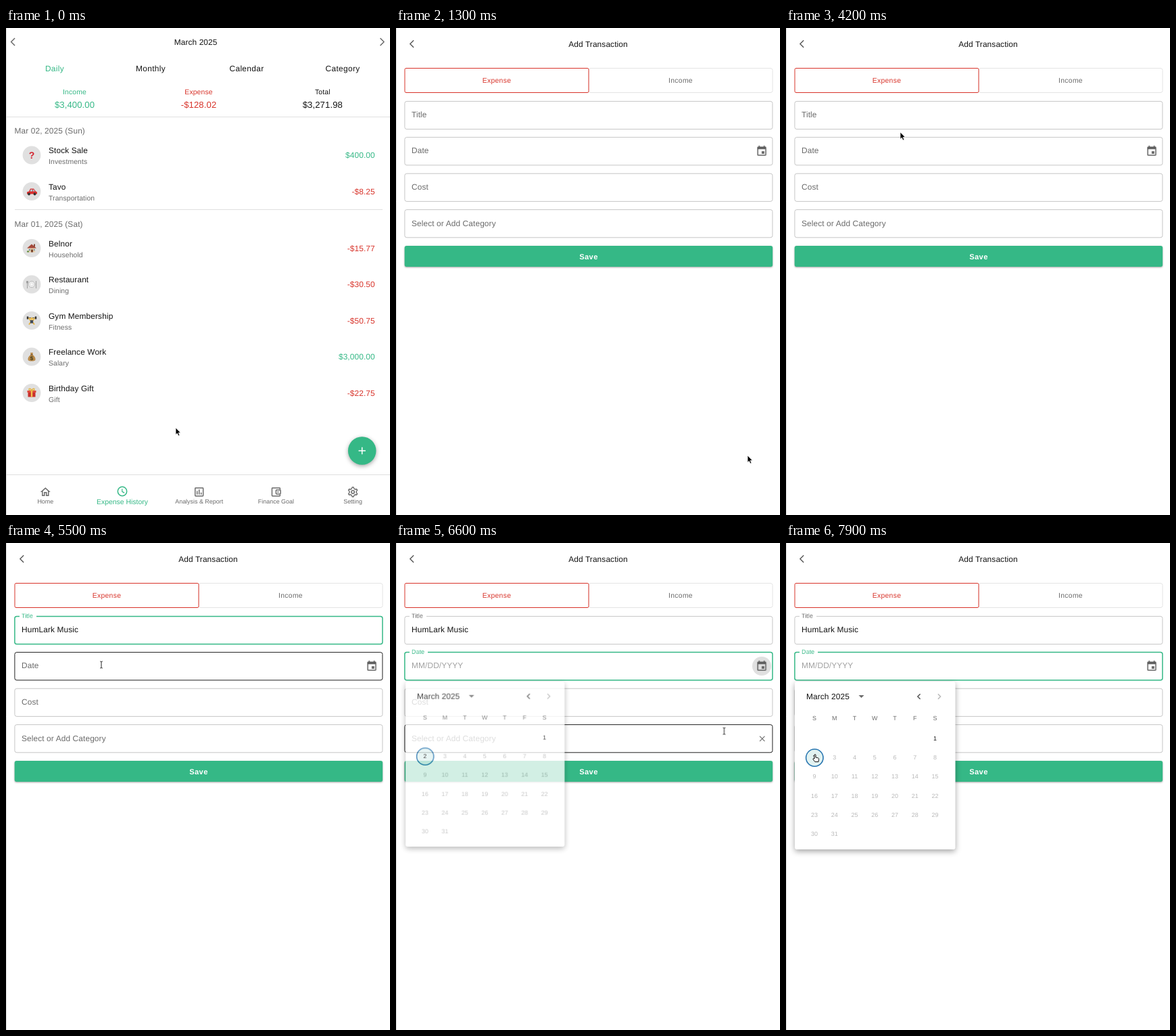
An HTML page that plays this animation: 568 px wide and 720 px high, repeating every 8 s.

```html
<!DOCTYPE html>
<html lang="en">
<head>
<meta charset="utf-8">
<title>Expense tracker</title>
<style>
html,body{margin:0;width:100%;height:100%;overflow:hidden;background:#fff}
svg{display:block;width:568px;height:720px}
text{font-family:"Liberation Sans",Arial,sans-serif;text-rendering:geometricPrecision;white-space:pre}
.fab{filter:drop-shadow(0 2px 3px rgba(0,0,0,.35))}
.save{filter:drop-shadow(0 1.5px 1.2px rgba(0,0,0,.35))}
.paper{filter:drop-shadow(0 3px 4px rgba(0,0,0,.36))}
.key{fill-opacity:0}
.popup{transform-origin:131.7px 205px}
.lab0{transform-origin:23px 132.2px}
.lab1{transform-origin:23px 185.6px}
</style>
</head>
<body>
<script>
const LOOP = 8000;
const GREEN = '#35b886', RED = '#d8342b', INK = '#141414', GREY = '#6b6b6b', LINE = '#c6c6c6';
const EASE = ';animation-timing-function:cubic-bezier(.4,0,.2,1)';
const OUT = ';animation-timing-function:cubic-bezier(0,0,.2,1)';

// Text placed by its vertical centre
function T(x, y, str, o = {}) {
  const {s = 11.9, c = INK, a = 'start', ls = .11, w = 400, k = ''} = o;
  return `<text class="${k}" x="${x}" y="${(y + s * .36).toFixed(2)}" font-size="${s}" fill="${c}" text-anchor="${a}" letter-spacing="${ls}" font-weight="${w}">${str}</text>`;
}
const mid = 'middle';
const line = (d, c = GREY, w = 1.4, k = '') =>
  `<path class="${k}" d="${d}" fill="none" stroke="${c}" stroke-width="${w}"/>`;
const rect = (x, y, w, h, r, attrs) =>
  `<rect x="${x}" y="${y}" width="${w}" height="${h}" rx="${r}" ${attrs}/>`;
const chevron = (x, y, dir, h, c, w) =>
  line(`M${x - dir * h / 4} ${y - h / 2}L${x + dir * h / 4} ${y}L${x - dir * h / 4} ${y + h / 2}`, c, w);
const icon = (x, y, body, c = GREY) =>
  `<g transform="translate(${x} ${y}) scale(.744) translate(-12 -12)" fill="${c}">${body}</g>`;

// Keyframes from {ms: declarations}
const css = [];
function anim(name, frames, ease = 'step-end') {
  const keys = Object.keys(frames);
  const body = keys.map(ms => `${ms / LOOP * 100}%{${frames[ms]}}`).join('');
  css.push(`@keyframes ${name}{${body}100%{${frames[keys[keys.length - 1]]}}}`,
    `.${name}{animation:${name} ${LOOP}ms ${ease} infinite}`);
}
// Alternating off/on at the given times
function show(name, on, ...times) {
  const f = {0: `opacity:${on}`};
  times.forEach((t, i) => f[t] = `opacity:${(i + on + 1) % 2}`);
  anim(name, f);
}

function gear() {
  let d = '';
  for (let i = 0; i < 24; i++) {
    const a = (i - .5) * Math.PI / 12, r = i % 4 < 2 ? 9.4 : 6.9;
    d += `${i ? 'L' : 'M'}${(12 + r * Math.sin(a)).toFixed(2)} ${(12 - r * Math.cos(a)).toFixed(2)}`;
  }
  return line(d + 'Z', GREY, 1.9) + `<circle cx="12" cy="12" r="3" fill="none" stroke="${GREY}" stroke-width="2"/>`;
}

const pics = {
  ask: `<text x="0" y="5" font-size="14" font-weight="700" text-anchor="middle" fill="#d32430">?</text>`,
  car: `<path d="M-7 1l3-1 2-4h5l3 4 2 1v3H-7z" fill="#d9302f"/><path d="M-2.5 0l1.2-2.8H1V0zM2 0v-2.8h1L4.6 0z" fill="#a9d4e8"/><circle cx="-4" cy="4" r="1.9" fill="#333"/><circle cx="4.5" cy="4" r="1.9" fill="#333"/>`,
  house: `<path d="M-5 0h10v6H-5z" fill="#e6cfaa"/><path d="M-7 0L0-6 7 0z" fill="#a5483a"/><path d="M3-6h2v4H3z" fill="#8a4a3c"/><path d="M-1 2h3v4h-3z" fill="#7a4630"/><path d="M-4 1.5h2v2h-2zM3 1.5h1.5v2H3z" fill="#5c96b8"/><path d="M-7 4h3v2h-3z" fill="#5d8b3c"/>`,
  plate: `<circle r="4.6" fill="#f7f7f7" stroke="#aaa" stroke-width=".8"/><circle r="2.6" fill="none" stroke="#ccc" stroke-width=".6"/><path d="M-6.5-5V6M6.5-5V6M-7.5-5v3h2v-3" fill="none" stroke="#999" stroke-width=".9"/>`,
  lift: `<path d="M-7-4H7" stroke="#555" stroke-width="1.2"/><path d="M-6-6v4M6-6v4" stroke="#333" stroke-width="2.4"/><path d="M-4.5-4L-2 0h4L4.5-4M-2 3L-4 6M2 3L4 6" fill="none" stroke="#e7b23c" stroke-width="1.7"/><circle cy="-2.8" r="2" fill="#edbd4d"/><path d="M-2.2-.5h4.4V4h-4.4z" fill="#424b58"/>`,
  bag: `<path d="M-2-6h4L1-3q5 3 4.5 7.5Q5 6.5 0 6.5T-5.5 4.5Q-6 0-1-3z" fill="#b98a4a"/><path d="M-2-3h4" stroke="#6d4a22"/><text y="4.6" font-size="8" font-weight="700" text-anchor="middle" fill="#3f3a1c">$</text>`,
  gift: `<path d="M-5.5-1h11v7h-11z" fill="#c9302c"/><path d="M-6.5-3.5h13V-.5h-13z" fill="#de4a3d"/><path d="M-1.2-3.5h2.4V6h-2.4z" fill="#f2c14e"/><path d="M0-3.5q-5 0-4-2.5 2-1.500 4 2.500 2-4 4-2.500 1 2.500-4 2.500" fill="none" stroke="#e5b13f" stroke-width="1.200"/>`
};

function entry([y, pic, name, kind, sum]) {
  return `<circle cx="38" cy="${y}" r="13.4" fill="#e0e0e0"/><g transform="translate(38 ${y})">${pics[pic]}</g>` +
    T(63, y - 7, name) + T(63, y + 9.5, kind, {s: 10.42, c: GREY}) +
    T(545.8, y, sum, {a: 'end', c: sum[0] == '-' ? RED : GREEN});
}

function listPage() {
  const tabs = ['Daily', 'Monthly', 'Calendar', 'Category']
    .map((t, i) => T(72 + 142 * i, 60, t, {a: mid, ls: .34, c: i ? INK : GREEN}));
  const totals = [[101.5, 'Income', '$3,400.00', GREEN], [285, 'Expense', '-$128.02', RED], [468.3, 'Total', '$3,271.98', INK]]
    .map(([x, n, v, c]) => T(x, 94, n, {s: 10.42, c, a: mid}) + T(x, 113, v, {s: 13.1, c, a: mid}));
  const rows = [
    [188, 'ask', 'Stock Sale', 'Investments', '$400.00'],
    [241.5, 'car', 'Tavo', 'Transportation', '-$8.25'],
    [325.5, 'house', 'Belnor', 'Household', '-$15.77'],
    [379, 'plate', 'Restaurant', 'Dining', '-$30.50'],
    [432.5, 'lift', 'Gym Membership', 'Fitness', '-$50.75'],
    [486, 'bag', 'Freelance Work', 'Salary', '$3,000.00'],
    [539.5, 'gift', 'Birthday Gift', 'Gift', '-$22.75']
  ].map(entry);
  const glyphs = [
    `<path d="M12 5.69l5 4.500V18h-2v-6H9v6H7v-7.810l5-4.500M12 3L2 12h3v8h6v-6h2v6h6v-8h3z"/>`,
    `<circle cx="12" cy="12" r="9" fill="none" stroke="${GREEN}" stroke-width="2"/>` + line('M11.700 7v5.500l4.500 2.700', GREEN, 1.6),
    rect(4, 4, 16, 16, 1, `fill="none" stroke="${GREY}" stroke-width="2"`) + line('M8 17v-7M12 17V7M16 17v-4', GREY, 2),
    line('M20 7V5a1 1 0 0 0-1-1H5a1 1 0 0 0-1 1v14a1 1 0 0 0 1 1h14a1 1 0 0 0 1-1v-2', GREY, 2) +
      rect(12, 8, 9, 8, 1, `fill="none" stroke="${GREY}" stroke-width="2"`) + '<circle cx="16" cy="12" r="1.5"/>',
    gear()
  ];
  const nav = ['Home', 'Expense History', 'Analysis &amp; Report', 'Finance Goal', 'Setting'].map((n, i) => {
    const x = 58.3 + 113.7 * i, on = i == 1;
    return icon(x, on ? 685 : 686, glyphs[i], on ? GREEN : GREY) +
      T(x, 700, n, {s: on ? 10.42 : 8.93, c: on ? GREEN : GREY, a: mid, ls: 0});
  });
  return `<g class="list">` + chevron(10.3, 20.5, -1, 11, '#666', 1.4) + chevron(556.3, 20.5, 1, 11, '#666', 1.4) +
    T(280.6, 20.3, 'March 2025', {a: mid}) + tabs.join('') + totals.join('') +
    line('M0 131.500H568M13 268.500H557M0 660.500H568', '#e0e0e0', 1) +
    T(12.5, 152, 'Mar 02, 2025 (Sun)', {c: GREY}) + T(12.5, 289.5, 'Mar 01, 2025 (Sat)', {c: GREY}) + rows.join('') +
    `<circle class="fab" cx="526.7" cy="625" r="20.8" fill="${GREEN}"/>` + line('M521.500 625h10.400M526.700 619.800v10.400', '#fff', 1.5) +
    nav.join('') + '</g>';
}

const fieldY = [129, 182.2, 235.8, 289.2];
const box = (i, k = '') => rect(12.9, fieldY[i] - 20.6, 544, 41.2, 3, `class="${k}" fill="none" stroke="${LINE}"`);
// Outlined input whose label floats up into the border
const floating = (i, name, gap) => box(i, 'box' + i) +
  `<g class="up${i}">${rect(20, fieldY[i] - 22.5, gap, 4, 0, 'fill="#fff"')}</g>` +
  `<g class="tint${i}">${T(23, fieldY[i] - 1, name, {c: 'inherit', k: 'lab' + i})}</g>`;

function popup() {
  const col = i => 42 + 29.75 * i;
  let s = rect(13, 205, 237.5, 248, 3, 'class="paper" fill="#fff"') + T(30, 227, 'March 2025') +
    `<path d="M107.500 225h8l-4 4z" fill="${GREY}"/>` +
    chevron(196.7, 227, -1, 7.5, '#555', 1.5) + chevron(226.7, 227, 1, 7.5, '#bbb', 1.5) +
    `<circle cx="42.300" cy="317.500" r="12.700" fill="#e2f2f1" stroke="#2775b0" stroke-width="1.600"/>`;
  [...'SMTWTFS'].forEach((d, i) => s += T(col(i), 258.7, d, {s: 8.93, c: GREY, a: mid}));
  for (let d = 1; d < 32; d++) {
    const n = d + 5;
    s += T(col(n % 7), 288.7 + 28.2 * Math.floor(n / 7), d, {s: 8.93, c: d < 3 ? INK : '#b9b9b9', a: mid});
  }
  return `<g class="dim"><g class="popup">${s}</g></g>`;
}

function formPage() {
  const typed = [...'HumLark Music']
    .map((ch, i) => `<tspan class="key" style="animation-delay:${i * 42}ms">${ch}</tspan>`).join('');
  return `<g class="form">` + chevron(23.5, 23.5, -1, 10.5, '#555', 1.4) + T(299, 23.5, 'Add Transaction', {a: mid}) +
    rect(285, 59.5, 272, 36, 3, 'fill="none" stroke="#e4e4e4"') + rect(13, 59.5, 272, 36, 2, `fill="#fff" stroke="${RED}"`) +
    T(149, 77.5, 'Expense', {s: 10.42, c: RED, a: mid, ls: .3}) + T(421, 77.5, 'Income', {s: 10.42, c: GREY, a: mid, ls: .3}) +
    floating(0, 'Title', 25) + T(23, 128, typed) +
    floating(1, 'Date', 27) + `<g class="up1">${T(23, 181.2, 'MM/DD/YYYY', {c: '#a0a0a0'})}</g>` +
    `<circle class="halo" cx="541" cy="182" r="14" fill="#e0e0e0"/>` +
    icon(541, 182, '<path d="M17 12h-5v5h5v-5zM16 1v2H8V1H6v2H5c-1.110 0-2 .9-2 2v14c0 1.100.890 2 2 2h14c1.100 0 2-.9 2-2V5c0-1.100-.9-2-2-2h-1V1h-2zm3 18H5V8h14v11z"/>', '#5c5c5c') +
    box(2) + T(23, 234.9, 'Cost', {c: GREY}) +
    box(3, 'box3') + T(23, 288.3, 'Select or Add Category', {c: GREY}) +
    line('M538 285.700l7.400 7.400m0-7.400l-7.400 7.400', GREY, 1.1, 'clear') +
    rect(12.7, 322, 544.4, 31, 3, `class="save" fill="${GREEN}"`) +
    T(285, 337.7, 'Save', {s: 11.16, c: '#fff', a: mid, ls: .32, w: 700}) +
    popup() + '</g>';
}

const pointer = `<g class="ptr"><g class="idle">
  <path class="arrow" d="M0 0V10.300L2.300 8.200 4 12 5.800 11.200 4.200 7.500H7.300Z" fill="#000" stroke="#fff" stroke-width=".7"/>
  <path class="hand" d="M-2 1V-4.500a1 1 0 0 1 2 0V-1L3.500-.2Q4.600.1 4.600 1.400L4 5.500H-1.200L-4.200 1.500Q-3.800.2-2 1Z" fill="#fff" stroke="#111"/>
  <path class="beam" d="M-1.800-5Q0-5 0-4V4Q0 5 1.800 5M1.800-5Q0-5 0-4M-1.800 5Q0 5 0 4" fill="none" stroke="#222"/>
</g></g>`;

// Pages
show('list', 1, 1160);
show('form', 0, 1160);

// Fields
const edge = (c, w = 1) => `stroke:${c};stroke-width:${w}`;
anim('box0', {0: edge(LINE), 4290: edge('#212121'), 4500: edge(GREEN, 1.5), 6200: edge(LINE)});
anim('box1', {0: edge(LINE), 5430: edge('#212121'), 6200: edge(GREEN, 1.5)});
anim('box3', {0: edge(LINE), 6490: edge('#212121'), 7000: edge(LINE)});
show('clear', 0, 6490, 7000);
show('up0', 0, 4540);
show('up1', 0, 6240);
anim('tint0', {0: `fill:${GREY}`, 4500: `fill:${GREEN}`, 6200: `fill:${GREY}`});
anim('tint1', {0: `fill:${GREY}`, 6200: `fill:${GREEN}`});
[4500, 6200].forEach((t, i) => anim('lab' + i, {
  0: 'transform:none',
  [t]: 'transform:translate(0,0) scale(1)' + OUT,
  [t + 200]: 'transform:translate(0,-21.4px) scale(.75)'
}, 'linear'));
anim('key', {0: 'fill-opacity:0', 4700: 'fill-opacity:1'});
anim('halo', {0: 'opacity:0', 6050: 'opacity:0', 6150: 'opacity:1', 6650: 'opacity:1', 6800: 'opacity:0'}, 'linear');

// Calendar grows while fading in
anim('dim', {0: 'opacity:0', 6440: 'opacity:0' + EASE, 6760: 'opacity:1'}, 'linear');
anim('popup', {0: 'transform:scale(.75,.5625)', 6440: 'transform:scale(.75,.5625)' + EASE, 6653: 'transform:scale(1,1)'}, 'linear');

// Pointer
const at = (x, y) => `transform:translate(${x}px,${y}px)`;
anim('ptr', {
  0: at(251, 591), 690: at(251, 591), 1000: at(520, 632), 4189: at(520, 632),
  4190: at(169, 154), 4210: at(169, 154), 4400: at(150, 130), 5300: at(150, 132),
  5490: at(141, 180), 5510: at(141, 180), 5700: at(200, 182), 5890: at(200, 182),
  6150: at(541, 182), 6400: at(541, 182), 6600: at(486, 278), 7000: at(250, 292),
  7600: at(47, 321), 7700: at(47, 321), 7800: at(44, 318)
}, 'linear');
anim('idle', {
  0: 'opacity:1', 494: 'opacity:1', 495: 'opacity:0', 694: 'opacity:0', 695: 'opacity:1', 1500: 'opacity:1',
  1900: 'opacity:0', 4189: 'opacity:0', 4190: 'opacity:1', 4600: 'opacity:1', 4601: 'opacity:0',
  5389: 'opacity:0', 5390: 'opacity:1'
}, 'linear');
show('arrow', 1, 960, 1160, 4290, 7000, 7580);
show('hand', 0, 960, 1160, 6080, 6440, 7580);
show('beam', 0, 4290, 6080, 6440, 7000);

document.head.insertAdjacentHTML('beforeend', `<style>${css.join('\n')}</style>`);
document.body.innerHTML = `<svg viewBox="0 0 568 720">${listPage()}${formPage()}${line('M.5 0V720', '#dcdcdc', 1)}${pointer}</svg>`;
</script>
</body>
</html>
```
